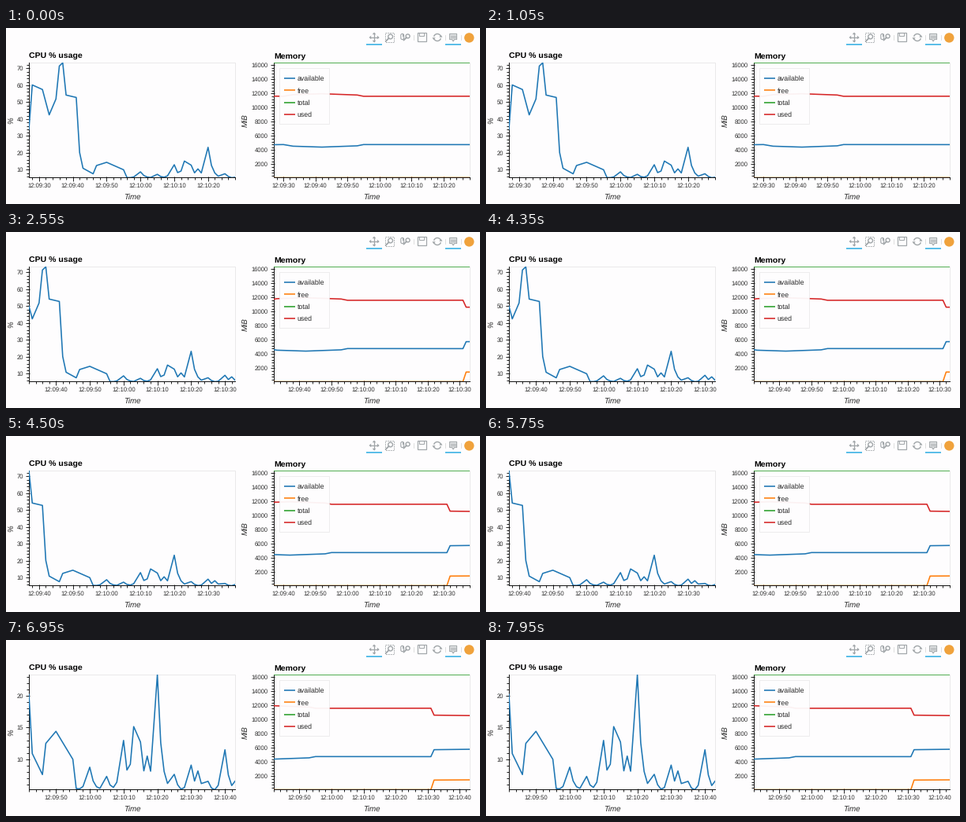
Recreate the animation shown at these times as a matplotlib script. Size 600 by 224 pixels, loop 8000 ms.

```python
import numpy as np
import matplotlib.pyplot as plt
from matplotlib.animation import FuncAnimation
from matplotlib.collections import LineCollection
from matplotlib.patches import Arc, Circle, FancyBboxPatch, Polygon, Rectangle

W, H, DPI = 600, 224, 100
PT = 72 / DPI                      # points per pixel
BLUE, ORANGE, GREEN, RED = "#1f77b4", "#ff7f0e", "#2ca02c", "#d62728"
ICON, ACTIVE, FRAME, INK = "#a1a6a9", "#26aae1", "#e5e5e5", "#2a2a2a"
PAPER = "#fefdfe"
TOP, BOTTOM = 44.3, 190.5
UPDATES = (37, 88, 138)            # ticks at which new samples arrive
SPAN, SHIFT = 61, 5                # seconds shown, seconds per update

plt.rcParams["font.family"] = "Liberation Sans"
plt.rcParams["text.hinting"] = "none"

# Sample times in seconds after 12:09:00; the sampler skips every fifth second.
times = np.array([t for t in range(27, 104) if t % 5 != 4])


def path(*points):
    return np.interp(times, *zip(*points))


def spikes(heights, width=1.15):
    return np.max([h * np.exp(-abs(times - t) / width) for t, h in heights.items()], axis=0)


# A busy start that drops to a slowly sinking floor with sharp spikes.
busy = path((27, 34), (28, 60.2), (31, 57.5), (33, 42.5), (35, 51.9), (36, 71.4),
            (37, 73.3), (38, 54.2), (41, 52.8), (42, 20.2), (43, 10.9), (46, 7.6),
            (47, 12.5), (50, 14.4), (55, 10), (56, 5.4), (57, 0))
idle = 5.6 - 0.009 * times + spikes({
    60: 3.7, 65: 2.3, 70: 8, 73: 10.2, 75: 7.8, 77: 5.6, 80: 18.4, 85: 2.8,
    90: 4.3, 92: 3.4, 95: 1.8, 100: 6.8, 103: 1.9})
cpu = np.maximum(busy, idle)

available = path((27, 4760), (30, 4780), (33, 4550), (42, 4420), (53, 4600),
                 (55, 4780), (91, 4770), (92, 5750), (103, 5810))
free = path((27, 100), (91, 110), (92, 1460), (103, 1490))
memory = [("available", available, BLUE), ("free", free, ORANGE),
          ("total", np.full(len(times), 16330), GREEN), ("used", 16380 - available, RED)]

fig = plt.figure(figsize=(W / DPI, H / DPI), dpi=DPI, facecolor=PAPER)
ax = fig.add_axes([0, 0, 1, 1])
ax.set(xlim=(0, W), ylim=(H, 0))
ax.axis("off")


def line(xs, ys, color, width, z=2, **kw):
    return ax.plot(xs, ys, color=color, lw=width * PT, zorder=z, **kw)[0]


def text(x, y, s, size, color=INK, ha="center", va="baseline", **kw):
    return ax.text(x, y, s, fontsize=size * PT, color=color, ha=ha, va=va, **kw)


def patch(p):
    return ax.add_patch(p)


def lens(x, y, r):
    patch(Circle((x, y), r, fill=False, ec=ICON, lw=1.4 * PT))
    line([x - 0.7 * r, x - 2 * r], [y + 0.7 * r, y + 2 * r], ICON, 1.8)


def toolbar():
    # pan
    x, y = 466, 12
    line([x - 5, x + 5], [y, y], ICON, 1.3)
    line([x, x], [y - 5, y + 5], ICON, 1.3)
    for dx, dy in ((1, 0), (-1, 0), (0, 1), (0, -1)):
        tip = (x + 6.5 * dx, y + 6.5 * dy)
        bx, by = x + 3.8 * dx, y + 3.8 * dy
        patch(Polygon([tip, (bx + 2.3 * dy, by + 2.3 * dx),
                       (bx - 2.3 * dy, by - 2.3 * dx)], fc=ICON, lw=0))
    # box zoom
    patch(Rectangle((479.7, 6.2), 11.6, 11.6, fill=False, ec=ICON, lw=0.9 * PT,
                    ls=(0, (2, 1.2))))
    lens(486.6, 11, 2.9)
    # wheel zoom
    patch(FancyBboxPatch((500.4, 8), 2.6, 6, fill=False, ec=ICON, lw=1.1 * PT,
                         boxstyle="round,pad=0.6,rounding_size=1.8"))
    line([501.7, 501.7], [8.5, 10.5], ICON, 1)
    lens(508.6, 10.4, 2.5)
    # save
    patch(Rectangle((520.5, 6.3), 11, 11, fill=False, ec=ICON, lw=1.2 * PT))
    patch(Rectangle((523, 6.3), 6, 3.6, fill=False, ec=ICON, lw=1 * PT))
    # reset
    for a in (15, 195):
        patch(Arc((546, 12), 9, 9, theta1=a, theta2=a + 135, ec=ICON, lw=1.4 * PT))
    patch(Polygon([(548.4, 11.8), (552.4, 11.8), (550.6, 8.6)], fc=ICON, lw=0))
    patch(Polygon([(539.6, 12.2), (543.6, 12.2), (541.4, 15.4)], fc=ICON, lw=0))
    # hover
    patch(Polygon([(561.6, 7.4), (570.6, 7.4), (570.6, 14.6), (567.6, 14.6), (566.1, 17),
                   (564.6, 14.6), (561.6, 14.6)], fc="#dfe1e2", ec=ICON, lw=1 * PT))
    for y in (9.7, 12):
        line([563.2, 569], [y, y], ICON, 0.9)
    for x in (515.5, 555.5, 576):
        line([x, x], [9, 15], "#d8d8d8", 0.8)
    for x in (456, 556):
        line([x, x + 20], [21.4, 21.4], ACTIVE, 1.5, solid_capstyle="butt")
    patch(Circle((586.3, 12.4), 6.2, fc="#f0a23c", lw=0))


def legend():
    patch(FancyBboxPatch((346, 51.5), 63, 71, boxstyle="square,pad=0", fc=PAPER,
                         ec=FRAME, lw=0.7 * PT, alpha=0.95, zorder=5))
    for i, (name, _, color) in enumerate(memory):
        y = 64.3 + 15.2 * i
        line([352, 366], [y, y], color, 1.6, z=6, solid_capstyle="butt")
        text(368.7, y + 3, name, 8.8, ha="left", zorder=6)


class Plot:
    def __init__(self, left, right, title, unit, unit_x, colors):
        self.left, self.right = left, right
        box = (left, TOP), right - left, BOTTOM - TOP
        patch(Rectangle(*box, fill=False, ec=FRAME, lw=0.8 * PT))
        clip = Rectangle(*box, transform=ax.transData)
        self.lines = [line([], [], c, 1.6, z=3) for c in colors]
        for ln in self.lines:
            ln.set_clip_path(clip)
        line([left, left, right], [TOP, BOTTOM, BOTTOM], "black", 0.9)
        text(left, 38.8, title, 10.5, "black", "left", weight="bold")
        text((left + right) / 2, 218.2, "Time", 9.8, style="italic")
        text(unit_x, 117.4, unit, 9.8, va="center", rotation=90, style="italic")
        self.ticks = ax.add_collection(LineCollection([], colors="black", lw=0.85 * PT))
        self.labels = []

    def update(self, t, series, lo, hi, step):
        bottom, top = min(map(min, series)), max(map(max, series))

        def px(v):
            return self.left + (np.asarray(v) - lo) / (hi - lo) * (self.right - self.left)

        def py(v):
            return BOTTOM - (np.asarray(v) - bottom) / (top - bottom) * (BOTTOM - TOP)

        for ln, ys in zip(self.lines, series):
            ln.set_data(px(t), py(ys))
        for label in self.labels:
            label.remove()
        self.labels, marks = [], []

        for s in range(lo + lo % 2, hi + 1, 2):
            x, major = float(px(s)), s % 10 == 0
            marks.append([(x, BOTTOM - 1.3 * major), (x, BOTTOM + (4.2 if major else 2.7))])
            if major:
                name = f"12:{9 + s // 60:02d}:{s % 60:02d}"
                self.labels.append(text(x, 203.4, name, 7.7))

        minor = step / 5
        for i in range(int(np.ceil(bottom / minor)), int(top / minor) + 1):
            y, major = float(py(i * minor)), i % 5 == 0
            marks.append([(self.left + 1.3 * major, y),
                          (self.left - (4.2 if major else 2.7), y)])
            if major:
                self.labels.append(text(self.left - 7, y + 2.8, str(i // 5 * step), 7.7,
                                        ha="right"))
        self.ticks.set_segments(marks)


toolbar()
legend()
cpu_plot = Plot(29, 290, "CPU % usage", "%", 7.2, [BLUE])
mem_plot = Plot(339, 586.5, "Memory", "MiB", 303.5, [m[2] for m in memory])


def window(start, end):
    return (times >= start) & (times <= end)


def draw(n):
    # While an update lands, both axes briefly span old and new samples.
    start = 27 + SHIFT * sum(n > u for u in UPDATES)
    extra = SHIFT if n in UPDATES else 0
    end = start + SPAN + extra

    old = window(start, start + SPAN)
    cpu_plot.update(times[old], [cpu[old]], start, end, 10 if np.ptp(cpu[old]) > 40 else 5)

    new = window(start + extra, end)
    mem_plot.update(times[new], [m[1][new] for m in memory], start, end, 2000)
    return []


anim = FuncAnimation(fig, draw, frames=160, interval=50, repeat=True, repeat_delay=0)
plt.show()
```
